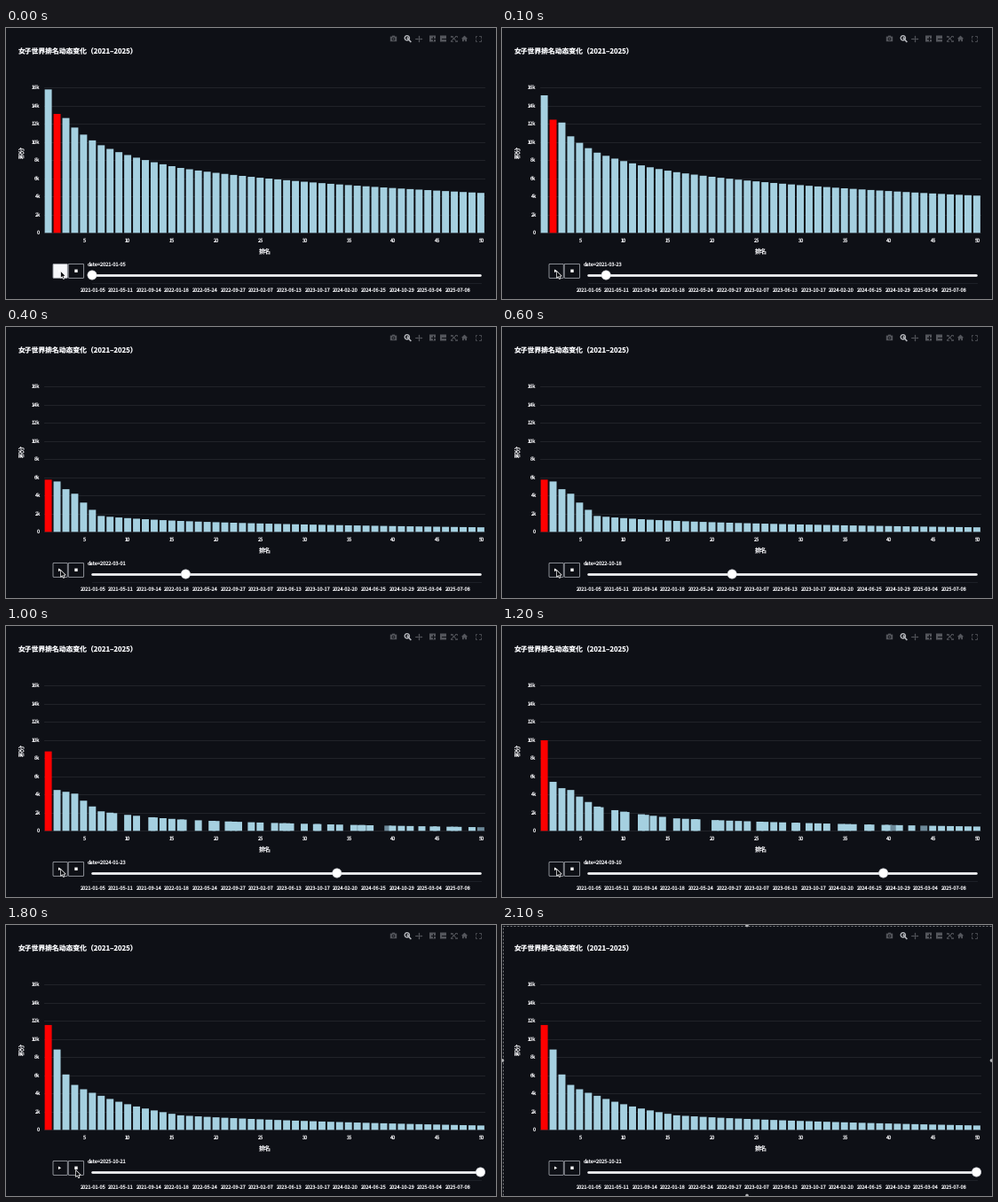
Recreate the animation shown at these times as a matplotlib script. Size 552 by 306 pixels, loop 2.2 s.

```python
import numpy as np
import matplotlib.pyplot as plt
from matplotlib.animation import FuncAnimation
from matplotlib.patches import Circle, FancyBboxPatch, Polygon, Rectangle

W, H, DPI = 552, 306, 100
PT = 72 / DPI
FRAMES = 22
BG, WHITE, TEXT = "#0e1016", "#f6f7fa", "#f2f2f5"
BLUE, FADED, RED = "#a5d0e0", "#6c8999", "#fe0000"
ICON, ICON_ON = "#54565c", "#b4b6bb"
STEP, X1, BASE, PER_K = 9.945, 47.6, 231.3, 10.25
RANKS = np.arange(1.0, 51)
START = np.datetime64("2021-01-05")

plt.rcParams["font.family"] = ["Noto Sans CJK JP", "DejaVu Sans"]
plt.rcParams["text.hinting"] = "none"
fig = plt.figure(figsize=(W / DPI, H / DPI), dpi=DPI, facecolor=BG)
ax = fig.add_axes([0, 0, 1, 1])
ax.set(xlim=(0, W), ylim=(H, 0))
ax.axis("off")


def line(xs, ys, color, width=1.0, **kw):
    return ax.plot(xs, ys, color=color, lw=width * PT, **kw)[0]


def text(x, y, s, px=5.6, color=TEXT, **kw):
    return ax.text(x, y, s, fontsize=px * PT, color=color, **kw)


def add(patch):
    return ax.add_patch(patch)


def box(x, y, w, h, color, **kw):
    return add(Rectangle((x, y), w, h, facecolor=color, lw=0, snap=False, **kw))


def bar_x(rank):
    return X1 + (rank - 1) * STEP


# Scores in thousands at a few ranks; straight in log rank and in time
KNOTS = np.log([1, 2, 3, 4, 7, 16, 50])
JAN21 = [15.8, 13.1, 12.65, 11.6, 9.65, 7.15, 4.4]
NOV21 = [13.85, 11.2, 11.15, 8.7, 7.2, 5.75, 3.5]
OCT22 = [5.75, 5.55, 4.7, 4.2, 1.75, 1.2, 0.5]
JAN24 = [8.75, 4.5, 4.3, 4.1, 2.15, 1.25, 0.4]
APR25 = [11.2, 6.3, 5.1, 4.9, 3.2, 1.5, 0.55]
OCT25 = [11.55, 8.85, 6.1, 4.95, 3.75, 1.6, 0.48]
TIMES = [0, 3, 4, 6, 10, 14, 16]
LEVELS = np.array([JAN21, NOV21, OCT22, OCT22, JAN24, APR25, OCT25])


def scores(f, ranks):
    now = [np.interp(f, TIMES, level) for level in LEVELS.T]
    return np.interp(np.log(ranks), KNOTS, now)


def layout(f):
    """Bar ranks and which bars are fading; mid-run, bars slide past each other."""
    if not 6 < f < 16:
        return RANKS, np.zeros(50, bool)
    rng = np.random.default_rng(f)
    moving = (RANKS > 7) & (RANKS < 50) & (rng.random(50) < 0.45)
    shift = rng.uniform(0.3, 0.8, 50) * rng.choice([-1, 1], 50)
    return RANKS + moving * shift, (RANKS > 38) & (rng.random(50) < 0.15)


def draw_toolbar():
    y = 12
    box(432.8, y - 2.4, 7.4, 5.6, ICON)
    box(434.9, y - 3.4, 3.2, 1.4, ICON)
    add(Circle((436.5, y + 0.4), 1.4, facecolor=ICON, edgecolor=BG, lw=0.6))
    add(Circle((451.8, y - 0.7), 2.6, fill=False, edgecolor=ICON_ON, lw=1))
    line([453.8, 455.8], [y + 1.3, y + 3.4], ICON_ON, 1.6)
    line([450.5, 453.1], [y - 0.7] * 2, ICON_ON, 0.8)
    line([451.8] * 2, [y - 2, y + 0.6], ICON_ON, 0.8)
    line([461.3, 467.7], [y, y], ICON, 0.9)
    line([464.5] * 2, [y - 3.2, y + 3.2], ICON, 0.9)
    for dx, dy, m in ((-3, 0, "<"), (3, 0, ">"), (0, -3, "^"), (0, 3, "v")):
        line([464.5 + dx], [y + dy], ICON, marker=m, ms=1.5, mew=0)
    for x in (480.5, 492.5):
        box(x - 3.5, y - 3.5, 7, 7, ICON)
        line([x - 2, x + 2], [y, y], BG, 1.1)
    line([480.5] * 2, [y - 2, y + 2], BG, 1.1)
    for s in (-1, 1):
        line([501.8, 507.2], [y - 2.7 * s, y + 2.7 * s], ICON, 0.9)
        for t in (-1, 1):
            for cx, a, b in ((504.5, 3.4, 1.8), (531.5, 3, 1.3)):
                line([cx + s * b, cx + s * a, cx + s * a],
                     [y + t * a, y + t * a, y + t * b], ICON, 0.8)
    add(Polygon([(512.8, y + 0.2), (516.5, y - 3.4), (520.2, y + 0.2)],
                facecolor=ICON, lw=0))
    for x in (514, 517.2):
        box(x, y, 1.8, 3.2, ICON)
    box(515, y - 1, 3, 2.4, ICON)


def draw_chart():
    text(13.5, 28, "女子世界排名动态变化（2021–2025）", 7.8, WHITE, weight="bold")
    for k in range(0, 17, 2):
        y = BASE - k * PER_K
        line([43, 539], [y, y], "#24262c", 0.9, zorder=1)
        text(38.5, y + 2, f"{k}k" if k else "0", ha="right")
    for r in range(5, 51, 5):
        text(bar_x(r), 242, str(r), ha="center")
    text(291.3, 254.6, "排名", 7, ha="center")
    text(17.8, 141, "积分", 7, ha="center", va="center", rotation=90)


def draw_slider():
    line([97, 535], [288, 288], "#22252c", 0.8)
    line([97, 533.5], [279, 279], WHITE, 2.7, solid_capstyle="round")
    for i in range(14):
        week = 18 * i + (i > 5)
        text(97 + 31.63 * i, 298, str(START + 7 * week), ha="center")


def button(x, w):
    return add(FancyBboxPatch((x, 266.4), w, 16, boxstyle="round,pad=0,rounding_size=1",
                              facecolor=BG, edgecolor="#989ba2", lw=0.65, zorder=3))


draw_toolbar()
draw_chart()
draw_slider()

bars = [box(0, BASE, 0.8 * STEP, 0, BLUE, zorder=2) for _ in RANKS]
date_text = text(92, 269, "")
knob = add(Circle((97, 279), 5.1, facecolor="white", edgecolor="#d5d7dc",
                  lw=0.5, zorder=4))
play = button(53, 16.3)
button(70.2, 17.4)
add(Polygon([(59, 272.5), (59, 276.1), (62.2, 274.3)], facecolor="white", lw=0, zorder=4))
box(77.3, 272.6, 3.4, 3.4, "white", zorder=4)

ARROW = np.array([(0, 0), (0, 8), (1.9, 6.4), (3.1, 9.2), (4.5, 8.6),
                  (3.3, 5.9), (5.8, 5.8)])
cursor = add(Polygon(ARROW, facecolor="#08090c", edgecolor="white", lw=0.5, zorder=6))

border = [add(Rectangle((0.5, 0.5), W - 1, H - 1, fill=False, edgecolor="#77797d",
                        lw=PT, ls=(0, (2, 2)), zorder=7))]
for spot in ((W / 2, 0.5), (W / 2, H - 0.5), (0.5, H / 2), (W - 0.5, H / 2)):
    border.append(add(Circle(spot, 1.8, facecolor="#b4b5b8", lw=0, zorder=8)))


def update(f):
    ranks, fading = layout(f)
    leader = 1 if f < 4 else 0
    for i, (bar, top) in enumerate(zip(bars, scores(f, ranks) * PER_K)):
        bar.set_bounds(bar_x(ranks[i]) - 0.4 * STEP, BASE - top, 0.8 * STEP, top)
        bar.set_facecolor(RED if i == leader else FADED if fading[i] else BLUE)

    week = int(np.clip(round(43.9 + 16.4 * (f - 3)), 0, 250))
    date_text.set_text(f"date={START + 7 * week}")
    knob.center = (np.clip(174 + 28.4 * (f - 3), 97, 534.5), 279)
    play.set_facecolor(WHITE if f == 0 else BG)

    move = np.clip((f - 15) / 2, 0, 1)
    cursor.set_xy(ARROW + (61.5 + 17 * move, 274.3 + 2.2 * move))
    cursor.set_visible(f < 19)
    for part in border:
        part.set_visible(f >= 19)
    return []


anim = FuncAnimation(fig, update, frames=FRAMES, interval=100, repeat=True,
                     init_func=lambda: update(0), blit=False)
plt.show()
```
